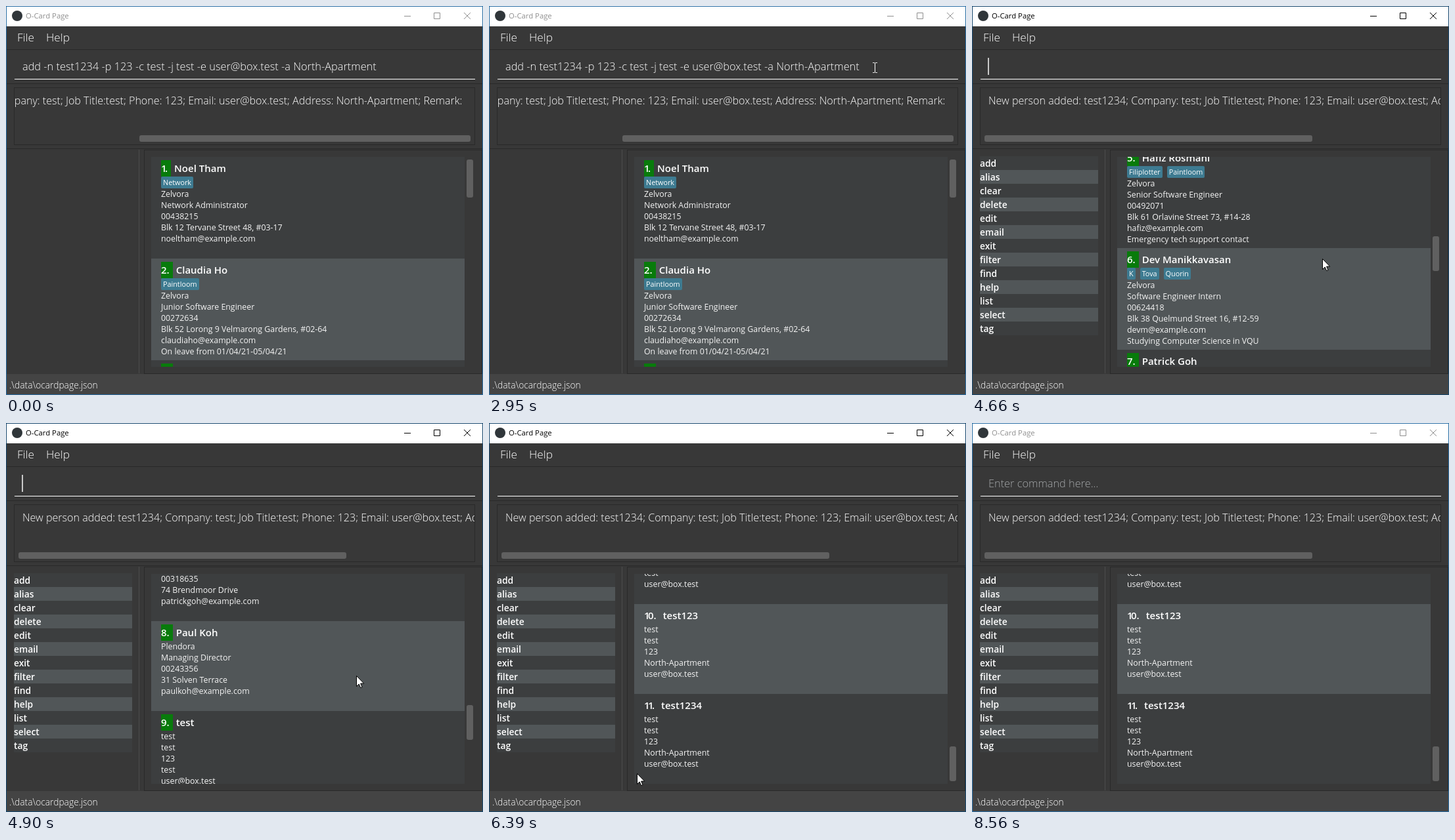
An HTML page for the animation above (8.71 s loop, 726 px wide and 593 px high).

```html
<!DOCTYPE html>
<html lang="en">
<head>
<meta charset="utf-8">
<title>O-Card Page</title>
<style>
  html, body { margin: 0; width: 100%; height: 100%; overflow: hidden; background: #383838; }
  #win { position: absolute; left: 0; top: 0; width: 726px; height: 593px; overflow: hidden;
    background: #383838; color: #fff; font-family: "Open Sans", "Noto Sans", sans-serif; }
  #win div, #win svg { position: absolute; box-sizing: border-box; }
  .text { line-height: 20px; white-space: pre; }
  .light { font-weight: 300; font-size: 16.33px; }
  .thumb { background: #606060; border-radius: 3px; }
  .rule { left: 0; width: 726px; height: 1px; background: #292929; }

  #bar { left: 0; top: 0; width: 726px; height: 31px; background: #fff; }
  #bar .text { left: 30px; top: 5px; font-size: 11.3px; }
  #logo { left: 9px; top: 7px; width: 16px; height: 16px; border-radius: 50%; background: #30363a; }
  #edge { left: 0; top: 0; width: 726px; height: 593px; border: 1px solid; }
  .menu { top: 38px; font-size: 17.2px; }

  #line { left: 13px; top: 111px; width: 701px; height: 1px; background: #fff; }
  #typed, #prompt { left: 25px; top: 82px; }
  #prompt { color: #a3a6a8; }
  #caret { top: 79px; width: 2px; height: 26px; background: #c9c9c9; }

  #result { left: 12px; top: 124px; width: 702px; height: 88px; border: 1px solid #292929; overflow: hidden; }
  #msg { top: 9px; font-size: 16.1px; }
  #hbar { top: 197px; height: 10px; }

  #commands { left: 12px; top: 229px; width: 180px; }
  #commands p { margin: 0; height: 21px; line-height: 21px; font-size: 13.8px; font-weight: 600; background: #3c3e3f; }
  #commands p:nth-child(even) { background: #515658; }
  #split { left: 202px; top: 219px; width: 1px; height: 341px; background: #4c4c4c; }

  #pane { left: 210px; top: 219px; width: 515px; height: 342px; border: 1px solid #292929; }
  #list { left: 221px; top: 230px; width: 477px; height: 320px; overflow: hidden; }
  #rows { left: 0; width: 477px; }
  #rows section { height: 137px; padding: 5px 15px 0; box-sizing: border-box; background: #3c3e3f; overflow: hidden; }
  #rows section.tagged { height: 155px; }
  #rows section:nth-child(even) { background: #515658; }
  h2 { margin: 0; height: 25px; line-height: 24px; font-size: 15px; font-weight: 600; white-space: nowrap; }
  h2 b { display: inline-block; height: 25px; padding-right: 5px; margin-right: 5px; font-weight: 600; }
  h2 b.mark { background: #087b0b; }
  h2 i { font-style: normal; letter-spacing: -2.6px; }
  .tags { display: flex; gap: 7px; height: 18px; }
  .tags span { padding: 0 3px; font-size: 10.8px; line-height: 18px; background: #3e7b91; border-radius: 2px; }
  #rows p { margin: 0; font-size: 12.35px; line-height: 17px; color: #f4f4f4; white-space: nowrap; }
  #vbar { left: 701px; width: 10px; }

  #status { left: 0; top: 561px; width: 726px; height: 32px; background: #444; }
  #status .text { left: 5px; top: 7px; font-size: 13.8px; font-weight: 300; }
  #arrow, #beam { left: 0; top: 0; overflow: visible; }
</style>
</head>
<body>
<div id="win">
  <div id="bar">
    <div id="logo"></div>
    <div class="text">O-Card Page</div>
    <svg style="left:0;top:0" width="726" height="31" fill="none" stroke="currentColor">
      <path d="M606 15.5h10M651.5 10.5h9v9h-9z"/>
      <path d="M697 10l10 10M707 10l-10 10"/>
    </svg>
  </div>
  <div class="text light menu" style="left:17px">File</div>
  <div class="text light menu" style="left:61px">Help</div>
  <div class="rule" style="top:66px"></div>

  <div id="typed" class="text light">add -n test1234 -p 123 -c test -j test -e user@box.test -a North-Apartment</div>
  <div id="prompt" class="text light">Enter command here...</div>
  <div id="caret"></div>
  <div id="line"></div>
  <div class="rule" style="top:118px"></div>

  <div id="result">
    <div id="msg" class="text light">New person added: test1234; Company: test; Job Title:test; Phone: 123; Email: user@box.test; Address: North-Apartment; Remark: </div>
  </div>
  <div id="hbar" class="thumb"></div>
  <div class="rule" style="top:217px"></div>

  <div id="commands"></div>
  <div id="split"></div>
  <div id="pane"></div>
  <div id="list"><div id="rows"></div></div>
  <div id="vbar" class="thumb"></div>

  <div id="status"><div class="text">.\data\ocardpage.json</div></div>
  <div id="edge"></div>
  <div id="ptr">
    <svg id="arrow" width="13" height="20"><path d="M.5.5v16l3.7-3.5 2.5 5.6 2.3-1-2.4-5.5h5.1z" fill="#fff" stroke="#000"/></svg>
    <svg id="beam" width="1" height="1"><path d="M-3-7.5h3M1-7.5h3M.5-7v14M-3 7.5h3M1 7.5h3" fill="none" stroke="#fff"/></svg>
  </div>
</div>
<script>
const LOOP = 8710;
const $ = id => document.getElementById(id);

// name | tags | company, job, phone, address, e-mail, remark
const people = [
  'Noel Tham|Network|Zelvora;Network Administrator;00438215;Blk 12 Tervane Street 48, #03-17;noeltham@example.com',
  'Claudia Ho|Paintloom|Zelvora;Junior Software Engineer;00272634;Blk 52 Lorong 9 Velmarong Gardens, #02-64;claudiaho@example.com;On leave from 01/04/21-05/04/21',
  'Melissa Quek|Network|Zelvora;Software Engineer;00210283;Blk 26 Ondrelle Street 74, #05-02;melissa@example.com',
  'Victor Ong|Tova|Zelvora;Software Engineer;00031282;Blk 83 Pelwick Street 26, #13-43;victorong@example.com',
  'Hafiz Rosmani|Filiplotter,Paintloom|Zelvora;Senior Software Engineer;00492071;Blk 61 Orlavine Street 73, #14-28;hafiz@example.com;Emergency tech support contact',
  'Dev Manikkavasan|K,Tova,Quorin|Zelvora;Software Engineer Intern;00624418;Blk 38 Quelmund Street 16, #12-59;devm@example.com;Studying Computer Science in VQU',
  'Patrick Goh|Network|Plendora;Project Manager;00318635;74 Brendmoor Drive;patrickgoh@example.com',
  'Paul Koh||Plendora;Managing Director;00243356;31 Solven Terrace;paulkoh@example.com',
  'test||test;test;123;test;user@box.test',
  'test123||test;test;123;North-Apartment;user@box.test',
  'test1234||test;test;123;North-Apartment;user@box.test'
];
const wrap = (items, tag) => items.map(s => `<${tag}>${s}</${tag}>`).join('');

$('rows').innerHTML = people.map((person, i) => {
  const [name, tags, lines] = person.split('|');
  const index = `${i + 1}.`.replace(/1/g, '<i>1</i>');
  return `<section class="${tags && 'tagged'}"><h2><b class="${i < 9 ? 'mark' : ''}">${index}</b>${name}</h2>` +
    (tags && `<div class="tags" style="position:static">${wrap(tags.split(','), 'span')}</div>`) +
    wrap(lines.split(';'), 'p') + '</section>';
}).join('');

$('commands').innerHTML =
  wrap('add alias clear delete edit email exit filter find help list select tag'.split(' '), 'p');

// Each key: [ms, declarations, number of jumps on the way to the next key]
let css = '';
function track(id, keys) {
  const frames = keys.map(([ms, decl, jumps = 1]) =>
    `${(Math.max(0, ms - 4) / LOOP * 100).toFixed(3)}%{${decl};animation-timing-function:steps(${jumps})}`);
  const last = keys[keys.length - 1][1];
  css += `@keyframes ${id}{${frames.join('')}100%{${last}}}#${id}{animation:${id} ${LOOP}ms infinite}`;
}
// Visibility that flips at each given time
const blink = (id, on, ...times) =>
  track(id, [0, ...times].map((ms, i) => [ms, `opacity:${(i + on) % 2}`]));

const ACTIVE = 3030, ENTER = 3500, BLUR = 8560;
track('bar', [[0, 'color:#8f8f8f'], [ACTIVE, 'color:#000'], [BLUR, 'color:#8f8f8f']]);
track('edge', [[0, 'border-color:#2a6ea5'], [ACTIVE, 'border-color:#18486f'], [BLUR, 'border-color:#2a6ea5']]);
track('msg', [[0, 'left:-251px'], [ENTER, 'left:12px']]);
track('hbar', [[0, 'left:203px;width:504px'], [ENTER, 'left:19px;width:499px']]);
blink('typed', 1, ENTER);
blink('commands', 0, 3580);
blink('prompt', 0, BLUR);

const caretFlips = [3190, 3970, 4430, 4980, 5450, 5920, 6470, 6940, 7470, 7950, 8480, BLUR];
const caretKeys = [[0, 'left:563px;opacity:0'], [ENTER, 'left:24px;opacity:1']];
caretFlips.forEach((ms, i) => caretKeys.push([ms, `left:${ms < ENTER ? 563 : 24}px;opacity:${(i + 1) % 2}`]));
track('caret', caretKeys.sort((a, b) => a[0] - b[0]));

const END = 1313;
const scroll = [[0, 0], [4510, 253], [4580, 443], [4660, 636], [4740, 760], [4900, 1013], [4980, END]];
track('rows', scroll.map(([ms, y]) => [ms, `top:${-y}px`]));
track('vbar', scroll.map(([ms, y]) =>
  [ms, y ? `top:${Math.round(493 - (END - y) * .21)}px;height:53px` : 'top:234px;height:58px']));

const path = [
  [0, 642, 302], [460, 642, 302, 5], [850, 560, 190, 6], [1320, 425, 53], [1400, 423, 51, 3],
  [1630, 452, 134, 4], [1930, 569, 76, 4], [2250, 577, 88], [2330, 580, 92, 8], [2950, 587, 94],
  [3190, 592, 94], [4350, 560, 250], [4430, 533, 385], [5130, 532, 388], [5210, 531, 391],
  [5600, 522, 398, 10], [6390, 225, 534], [6470, 227, 543], [6540, 240, 543, 5], [6940, 391, 530, 6],
  [7390, 350, 538], [7470, 355, 534, 4], [7800, 330, 536], [7950, 380, 545, 4], [8250, 617, 590]
];
track('ptr', path.map(([ms, x, y, jumps]) => [ms, `left:${x}px;top:${y}px`, jumps]));
blink('arrow', 0, 460, 850, 1320, 1480, 4350, 8250);
blink('beam', 0, 850, 1320, 1480, 4350);

const sheet = document.createElement('style');
sheet.textContent = css;
document.head.append(sheet);
</script>
</body>
</html>
```
